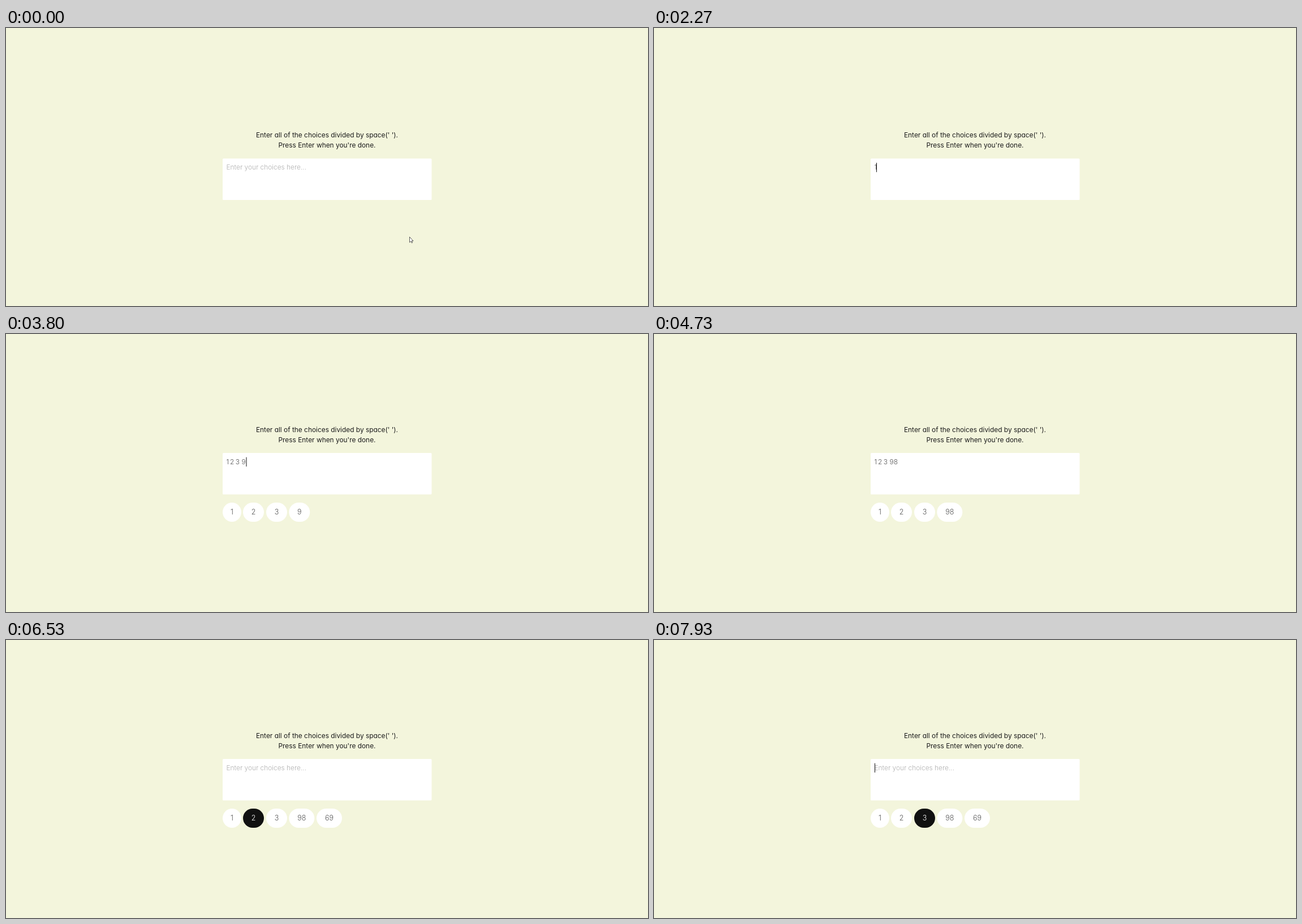
An HTML page that plays this animation: 1135x493 px, repeating every 8 s.

```html
<!DOCTYPE html>
<html lang="en">
<head>
<meta charset="utf-8">
<title>Random choice picker</title>
<style>
  html, body { margin: 0; width: 100%; height: 100%; overflow: hidden; background: #f3f5dc; }
  svg { display: block; width: 1135px; height: 493px; }
  text {
    font: 300 11.9px Inter, "Open Sans", sans-serif;
    font-feature-settings: "cv11";
    fill: #555;
    white-space: pre;
  }
  .head text { font-weight: 400; fill: #1c1c1c; text-anchor: middle; }
  .hint { fill: #b0b0b0; }
  .chip rect { fill: #fff; }
  .chip text { font-size: 12.5px; text-anchor: middle; }
  .chip.on rect { fill: #111; }
  .chip.on text { fill: #fff; }
</style>
</head>
<body>
<svg viewBox="0 0 1135 493">
  <g id="form">
    <g class="head">
      <text x="567.5" y="194">Enter all of the choices divided by space(' ').</text>
      <text x="567.5" y="212">Press Enter when you're done.</text>
    </g>
    <rect x="383" y="231.5" width="369.5" height="73.5" rx="1.5" fill="#fff"/>
    <text id="hint" class="hint" x="389.5" y="251.3">Enter your choices here...</text>
    <g id="words"></g>
    <rect id="caret" y="239" width="1" height="16.5" fill="#111"/>
  </g>
  <g id="chips"></g>
  <path id="arrow" d="M.5 .5V10.2L2.8 8.1L4.3 11.2L5.7 10.5L4.3 7.5H7Z" fill="#fff" stroke="#333" stroke-width=".8"/>
  <path id="beam" d="M-2 -6H2M0 -6V6M-2 6H2" fill="none" stroke="#333" stroke-width=".8"/>
</svg>
<script>
const LOOP = 8000, STEP = 200 / 3;
const FOCUS = 1470, ENTER = 5670, CLEAR = 5800, PICK = 5910, BLINK = 530;

// time, character, caret position after it
const keys = [
  [2270, '1', 393], [2470, ' ', 396], [2670, '2', 403], [2870, ' ', 406],
  [3200, '3', 413], [3530, ' ', 416], [3670, '9', 424.5], [3870, '8', 431.5],
  [4200, ' ', 434], [4870, '6', 441.5], [5000, '9', 449]
];
const wordX = [389.5, 396, 405.7, 416.5, 434];
const chipX = [383, 419, 460, 500.3, 549];
const picks = '204103140324102403142';

const $ = id => document.getElementById(id);
const make = (tag, parent, attrs = {}) => {
  const el = document.createElementNS('http://www.w3.org/2000/svg', tag);
  for (const k in attrs) el.setAttribute(k, attrs[k]);
  return parent.appendChild(el);
};
const show = (el, on) => { el.style.display = on ? '' : 'none'; };
const place = (el, x, y) => el.setAttribute('transform', `translate(${x} ${y})`);

const words = wordX.map(x => make('text', $('words'), { x, y: 251.3 }));
const chips = chipX.map(x => {
  const g = make('g', $('chips'), { class: 'chip' });
  return {
    g, x,
    box: make('rect', g, { x, y: 299, height: 34, rx: 17 }),
    label: make('text', g, { y: 320.4 })
  };
});

const typed = t => keys.filter(k => k[0] <= t).map(k => k[1]).join('').split(' ');
const chipWidth = s => s === '1' ? 33 : s.length > 1 ? 45 : 37;

function drawCaret(t) {
  let x = 390, line = 0, since = FOCUS;
  if (t >= CLEAR) since = CLEAR;
  else if (t >= ENTER) { since = ENTER; line = 18; }
  else for (const k of keys) if (k[0] <= t) [since, , x] = k;
  show($('caret'), t >= FOCUS && Math.floor((t - since) / BLINK) % 2 === 0);
  $('caret').setAttribute('x', x);
  $('caret').setAttribute('y', 239 + line);
}

function drawPointer(t) {
  const p = Math.min(1, Math.max(0, (t - 1070) / 400));
  const e = p * p * (3 - 2 * p);
  const x = 713 - 63 * e, y = 370 - 108 * e;
  const inside = y < 305;
  show($('arrow'), !inside);
  show($('beam'), inside && t < keys[0][0]);
  place($('arrow'), x, y);
  place($('beam'), x, y);
}

function draw(t) {
  const text = t < CLEAR ? typed(t) : [''];
  const tags = typed(t - 60).filter(Boolean);   // chips follow on key release
  const lit = t >= PICK ? +picks[Math.floor((t - PICK) / 100)] : -1;

  place($('form'), 0, tags.length ? -20.5 : 0);
  show($('hint'), !text[0]);
  words.forEach((w, i) => { w.textContent = text[i] || ''; });
  chips.forEach((c, i) => {
    const s = tags[i];
    show(c.g, s);
    if (!s) return;
    const w = chipWidth(s);
    c.box.setAttribute('width', w);
    c.label.setAttribute('x', c.x + w / 2);
    c.label.textContent = s;
    c.g.classList.toggle('on', i === lit);
  });
  drawCaret(t);
  drawPointer(t);
}

const start = performance.now();
function tick() {
  const t = Math.max(0, performance.now() - start) % LOOP;
  const n = Math.min(119, Math.floor((t + 4) / STEP));
  draw(Math.round(n * STEP / 10) * 10);
  requestAnimationFrame(tick);
}
tick();
</script>
</body>
</html>
```
